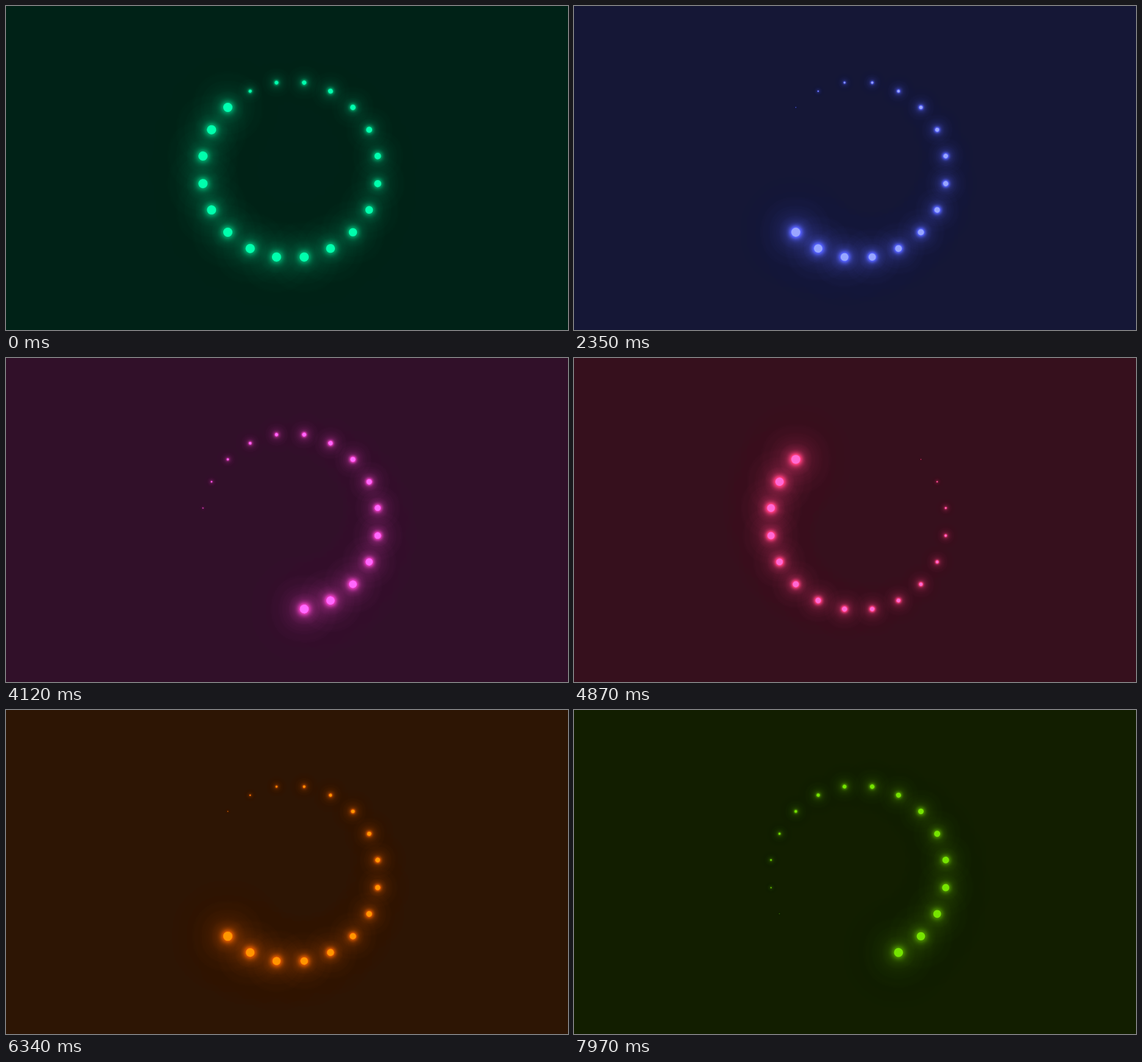
Write an HTML page that moves like this. It is 921 by 532 pixels and loops after 8000 ms.

```html
<!DOCTYPE html>
<html lang="en">
<head>
<meta charset="utf-8">
<title>Glowing ring loader</title>
<style>
  html, body { margin: 0; width: 100%; height: 100%; overflow: hidden; background: #042104; }
  #scene { position: absolute; inset: 0; overflow: hidden; background: #042104; }
  #ring { position: absolute; left: 356px; top: 159px; width: 220px; height: 220px; }
  .arm { position: absolute; inset: 0; }
  .dot {
    --glow: #00ff0a;
    width: 15px;
    height: 15px;
    border-radius: 50%;
    background: var(--glow);
    box-shadow: 0 0 10px var(--glow), 0 0 20px var(--glow), 0 0 40px var(--glow),
                0 0 60px var(--glow), 0 0 80px var(--glow), 0 0 100px var(--glow);
  }
</style>
</head>
<body>
<div id="scene"><div id="ring"></div></div>
<script>
  const LOOP = 8000;        // ms
  const STEP = 147.8;       // ms each pose is held
  const STEP_OFFSET = 23;   // ms
  const START = 1.165;      // seconds already played when the loop begins
  const STEP_SECONDS = 0.1476;
  const COUNT = 20;
  const PULSE = 2;          // seconds per dot cycle
  const SHRINK = 1.6;       // seconds from full size to nothing
  const HUE_PERIOD = 10;    // seconds per turn of the colour wheel

  const scene = document.getElementById('scene');
  const ring = document.getElementById('ring');

  const dots = Array.from({ length: COUNT }, (_, i) => {
    const arm = document.createElement('div');
    const dot = document.createElement('div');
    arm.className = 'arm';
    arm.style.transform = `rotate(${(i + 1) * 360 / COUNT}deg)`;
    dot.className = 'dot';
    arm.append(dot);
    ring.append(arm);
    return dot;
  });

  // Dots wait at full size until their delay has passed.
  function dotScale(seconds, delay) {
    const elapsed = seconds - delay;
    return elapsed < 0 ? 1 : Math.max(0, 1 - (elapsed % PULSE) / SHRINK);
  }

  function draw(now) {
    const step = Math.floor((now % LOOP + STEP_OFFSET) / STEP);
    const seconds = START + step * STEP_SECONDS;
    scene.style.filter = `hue-rotate(${seconds / HUE_PERIOD * 360}deg)`;
    dots.forEach((dot, i) => {
      dot.style.transform = `scale(${dotScale(seconds, (i + 1) * PULSE / COUNT)})`;
    });
  }

  function tick() {
    draw(performance.now());
    requestAnimationFrame(tick);
  }
  tick();
</script>
</body>
</html>
```
